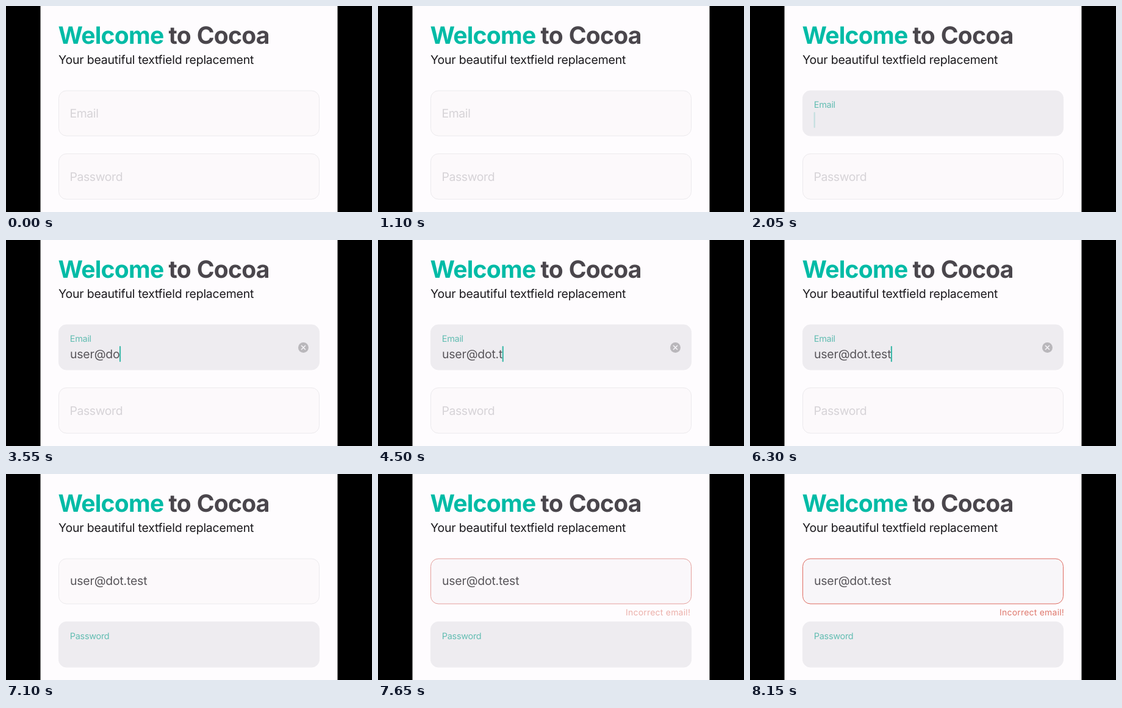
Write an HTML page that moves like this. It is 600 px wide and 338 px high and loops after 8.2 s.

```html
<!DOCTYPE html>
<html lang="en">
<head>
<meta charset="utf-8">
<title>Text field demo</title>
<style>
  html, body { margin: 0; width: 100%; height: 100%; overflow: hidden; background: #000; }
  svg { display: block; width: 600px; height: 338px; font-family: Inter, Roboto, "Liberation Sans", sans-serif; font-variant-ligatures: none; text-rendering: geometricPrecision; }
  .title { font-size: 39.1px; font-weight: 700; letter-spacing: -.02em; fill: #4a464c; }
  .title .accent { fill: #00bba6; }
  .subtitle { font-size: 19.5px; letter-spacing: -.0115em; fill: #1a181c; }
  .hint { font-size: 19.4px; letter-spacing: -.02em; }
  .value { font-size: 19.5px; letter-spacing: -.0115em; fill: #58555a; }
  .error { font-size: 14px; letter-spacing: .015em; fill: #df786d; }
</style>
</head>
<body>
<svg viewBox="0 0 600 338">
  <rect x="56.5" width="487" height="338" fill="#fefcfe"/>
  <g class="title">
    <text class="accent" x="85.5" y="62">Welcome</text>
    <text x="266.5" y="62">to</text>
    <text x="312.7" y="62">Cocoa</text>
  </g>
  <text class="subtitle" x="86" y="95.3">Your beautiful textfield replacement</text>

  <rect id="emailBox" x="86.5" y="139" width="427" height="74" rx="12.5"/>
  <text id="emailHint" class="hint">Email</text>
  <text id="value" class="value" x="105"></text>
  <rect id="caret" y="174" width="2.2" height="26" rx="1" fill="#40baab"/>
  <g id="clear">
    <circle cx="487.5" cy="176.5" r="8.5" fill="#b9b7bb"/>
    <path d="M484.5 173.5l6 6m0-6l-6 6" stroke="#f3f1f5" stroke-width="1.7" stroke-linecap="round"/>
  </g>
  <text id="error" class="error" x="409" y="232">Incorrect email!</text>

  <rect id="passBox" x="86.5" y="242.5" width="427" height="74.5" rx="12.5"/>
  <text id="passHint" class="hint">Password</text>
</svg>
<script>
const LOOP = 8200, FADE = 400;
const EMAIL_FOCUS = 1200, CARET_ON = 1400, PASS_FOCUS = 6600, FAIL = 7430;
const ADDRESS = "user@dot.test";
const KEYS = [2400, 2570, 2740, 2900, 3150, 3330, 3480, 3800, 4050, 4350, 4650, 4850, 5050];
const SHAKE = [0, -8, 8, -8, 8, -4, 4, -2, 2, 0];
const SHAKE_TIME = 600;

const IDLE = [252, 249, 251], FOCUS = [238, 236, 240], FAILED = [248, 246, 249];
const EDGE = [236, 234, 237], RED = [222, 105, 95];
const GREY = [214, 211, 215], TEAL = [98, 189, 178];

const el = id => document.getElementById(id);
const [emailBox, emailHint, value, caret, clear, error, passBox, passHint] =
  ["emailBox", "emailHint", "value", "caret", "clear", "error", "passBox", "passHint"].map(el);

const clamp = v => Math.min(1, Math.max(0, v));
const lerp = (a, b, p) => a + (b - a) * p;
const mix = (a, b, p) => a.map((v, i) => lerp(v, b[i], p));
const rgb = c => `rgb(${c.map(Math.round)})`;
const ease = (t, start) => {
  const p = clamp((t - start) / FADE);
  return p * p * (3 - 2 * p);
};

function paintBox(box, fill, edge) {
  box.setAttribute("fill", rgb(fill));
  box.setAttribute("stroke", rgb(edge));
}

// The hint shrinks and rises while it turns teal.
function paintHint(hint, baseline, p) {
  const y = lerp(baseline, baseline - 16.3, p);
  hint.setAttribute("transform", `translate(${lerp(104.5, 104.8, p)} ${y}) scale(${lerp(1, .745, p)})`);
  hint.setAttribute("fill", rgb(mix(GREY, TEAL, p)));
}

function blink(age) {
  const p = age % 1000 / 1000;
  return p < .85 ? clamp((.7 - p) / .2) : (p - .85) / .15;
}

function caretAlpha(t) {
  if (t < CARET_ON || t >= PASS_FOCUS) return 0;
  const lastKey = KEYS[KEYS.length - 1];
  if (t < KEYS[0]) return blink(t - CARET_ON);
  return t < lastKey ? 1 : blink(t - lastKey);
}

function shakeAt(age) {
  const pos = clamp(age / SHAKE_TIME) * (SHAKE.length - 1);
  const i = Math.min(Math.floor(pos), SHAKE.length - 2);
  return lerp(SHAKE[i], SHAKE[i + 1], pos - i);
}

function draw(t) {
  const inEmail = ease(t, EMAIL_FOCUS);
  const inPass = ease(t, PASS_FOCUS);
  const failed = ease(t, FAIL);
  const emailFocus = inEmail - inPass;

  paintBox(emailBox, mix(mix(IDLE, FOCUS, emailFocus), FAILED, failed),
    mix(mix(EDGE, FOCUS, emailFocus), RED, failed));
  paintBox(passBox, mix(IDLE, FOCUS, inPass), mix(EDGE, FOCUS, inPass));
  paintHint(emailHint, 183, inEmail);
  paintHint(passHint, 287, inPass);
  emailHint.style.opacity = 1 - inPass;

  const typed = KEYS.filter(k => k <= t).length;
  value.textContent = ADDRESS.slice(0, typed);
  value.setAttribute("y", lerp(194, 182, inPass));
  clear.style.opacity = typed && t < PASS_FOCUS ? 1 : 0;

  caret.setAttribute("x", typed ? 104.5 + value.getComputedTextLength() : 104.6);
  caret.style.opacity = caretAlpha(t);

  error.style.opacity = failed;
  error.setAttribute("transform", `translate(${shakeAt(t - FAIL)} 0)`);
}

const begin = performance.now();
function tick() {
  draw((performance.now() - begin) % LOOP);
  requestAnimationFrame(tick);
}
tick();
</script>
</body>
</html>
```
